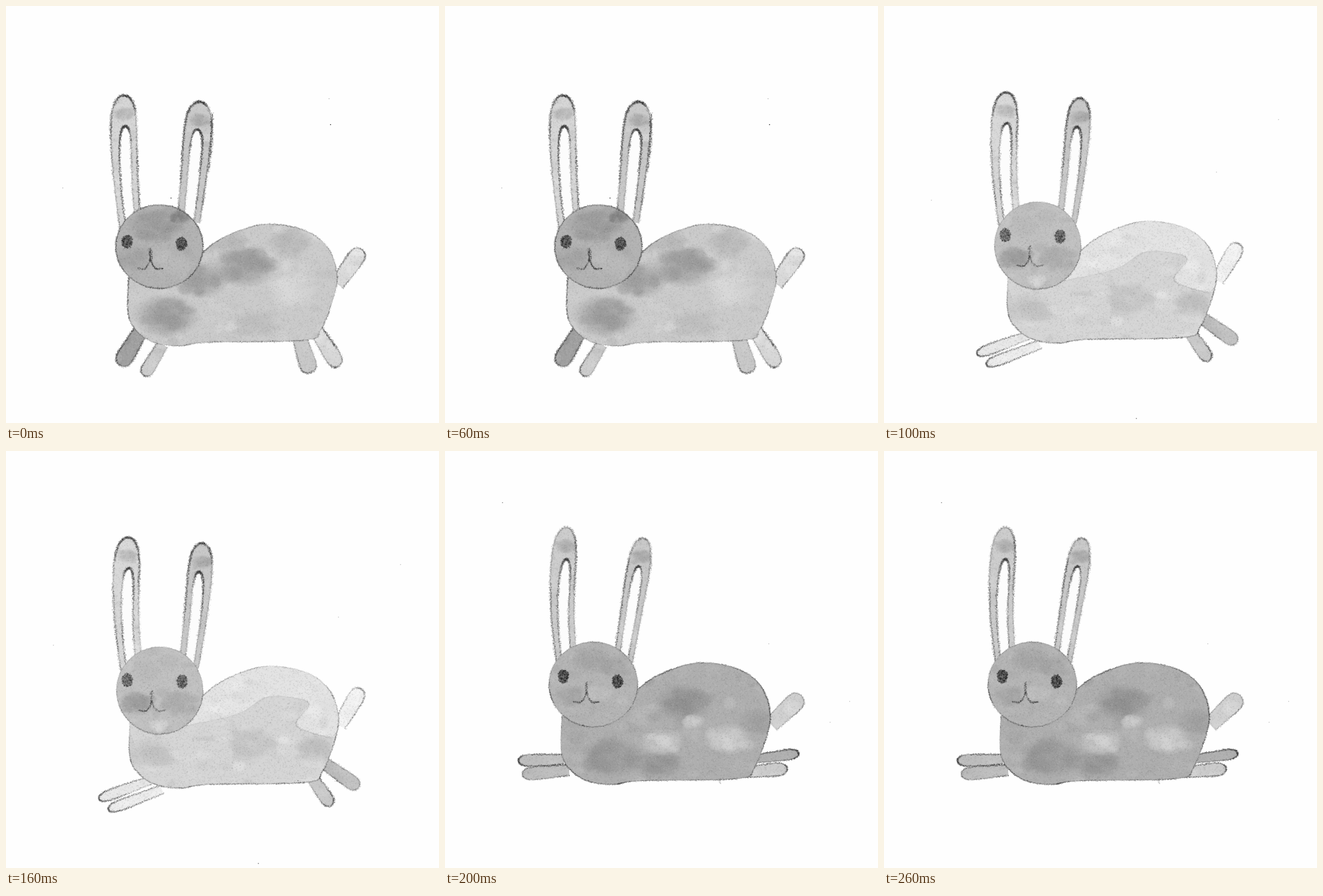
Write an HTML page with a canvas that moves like this. It is 600x579 px and loops after 300 ms.

```html
<!DOCTYPE html>
<html lang="en">
<head>
<meta charset="utf-8">
<title>Running rabbit</title>
<style>
html, body { margin: 0; width: 100%; height: 100%; overflow: hidden; background: #fefefe; }
canvas { display: block; }
</style>
</head>
<body>
<canvas id="stage" width="600" height="579"></canvas>
<script>
const W = 600, H = 579, HOLD = 100;
let g, seed;

function rnd() {
  seed = (seed * 1664525 + 1013904223) >>> 0;
  return seed / 4294967296;
}
const spread = r => (rnd() + rnd() - 1) * r;
const mix = (a, b, t) => a + (b - a) * t;
const gray = (v, a = 1) => `rgba(${v},${v},${v},${a})`;

// Outlines: lists of [x, y], about one per pixel

// Open Catmull-Rom curve through key points
function curve(keys) {
  const at = i => keys[Math.max(0, Math.min(keys.length - 1, i))], out = [];
  for (let i = 0; i < keys.length - 1; i++) {
    const [a, b, c, d] = [-1, 0, 1, 2].map(k => at(i + k));
    const steps = Math.ceil(Math.hypot(c[0] - b[0], c[1] - b[1]));
    for (let k = 0; k < steps; k++) {
      const t = k / steps;
      out.push([0, 1].map(j => b[j] + t / 2 * (c[j] - a[j] +
        t * (2 * a[j] - 5 * b[j] + 4 * c[j] - d[j] + t * (3 * (b[j] - c[j]) + d[j] - a[j])))));
    }
  }
  return out;
}

// Rounded leaf from base to tip, widest near the tip, for ears, legs and tail
function petal([bx, by], [tx, ty], w, bend = 0) {
  const len = Math.hypot(tx - bx, ty - by), out = [];
  const nx = (by - ty) / len, ny = (tx - bx) / len;
  const n = Math.ceil(len + w);
  for (let i = -n; i <= n; i++) {
    const u = Math.sin((1 - Math.abs(i) / n) * Math.PI / 2);
    const half = Math.sign(i) * w * (.75 + .25 * u) * Math.sqrt(1 - u ** 9);
    out.push([mix(bx, tx, u) + bend * Math.sin(Math.PI * u) + nx * half, mix(by, ty, u) + ny * half]);
  }
  return out;
}

function oval(x, y, rx, ry) {
  const n = Math.ceil(Math.PI * (rx + ry));
  return Array.from({ length: n + 1 }, (_, i) => {
    const a = i / n * 2 * Math.PI;
    return [x + Math.cos(a) * rx, y + Math.sin(a) * ry];
  });
}

function bodyLine(dx, dy) {
  const keys = [[268, 346], [290, 328], [320, 313], [357, 303], [395, 306], [427, 318], [448, 339], [458, 368],
    [456, 397], [437, 448], [413, 464], [280, 467], [240, 472], [205, 467], [180, 450], [169, 425], [170, 376]];
  return curve(keys.map(([x, y]) => [x + dx, y + dy]));
}

function pathOf(line) {
  const p = new Path2D();
  line.forEach(([x, y]) => p.lineTo(x, y));
  return p;
}

function soft(x, y, rx, ry, tone, alpha) {
  const f = g.createRadialGradient(0, 0, 0, 0, 0, 1);
  f.addColorStop(0, gray(tone, alpha));
  f.addColorStop(.6, gray(tone, alpha * .85));
  f.addColorStop(1, gray(tone, 0));
  g.save();
  g.translate(x, y);
  g.scale(rx, ry);
  g.fillStyle = f;
  g.fillRect(-1, -1, 2, 2);
  g.restore();
}

// Ink wash: mottled base tone, ragged pools [x, y, radius, tone], paper grain
function wash(line, tone, pools = []) {
  const xs = line.map(q => q[0]), ys = line.map(q => q[1]);
  const x0 = Math.min(...xs), y0 = Math.min(...ys);
  const w = Math.max(...xs) - x0, h = Math.max(...ys) - y0;
  g.save();
  g.clip(pathOf(line));
  g.fillStyle = gray(tone);
  g.fillRect(x0, y0, w, h);
  for (let i = w * h / 350; i > 0; i--)
    soft(x0 + rnd() * w, y0 + rnd() * h, 5 + rnd() * 14, 4 + rnd() * 9, tone + spread(45), .25);
  for (const [x, y, r, v] of pools) {
    soft(x, y, r * 1.5, r, v, .6);
    for (let i = 0; i < 12; i++)
      soft(x + spread(r * 1.4), y + spread(r * .8), r * (.3 + rnd() * .4), r * (.2 + rnd() * .3), v, .4);
  }
  for (let i = w * h / 4; i > 0; i--) {
    g.fillStyle = gray(rnd() < .5 ? 255 : 80, .08);
    g.fillRect(x0 + rnd() * w, y0 + rnd() * h, 1.3, 1.3);
  }
  g.restore();
}

// Grainy crayon line whose pressure wanders
function pencil(line, width, dark) {
  let press = .8;
  g.strokeStyle = gray(70, dark * .2);
  g.lineWidth = width * .5;
  g.stroke(pathOf(line));
  for (const [x, y] of line) {
    press = Math.max(.4, Math.min(1.1, press + spread(.15)));
    for (let k = width * 1.2 * press; k > 0; k--) {
      g.fillStyle = gray(35 + rnd() * 50 | 0, dark * press * (.3 + rnd() * .6));
      g.fillRect(x + spread(width * .8) - .5, y + spread(width * .8) - .5, 1.1, 1.1);
    }
  }
}

function part(line, tone, width, dark, pools) {
  wash(line, tone, pools);
  pencil(line, width, dark);
}

function ear(base, tip, w, bend, tone, dark) {
  const inner = petal(base, [0, 1].map(j => mix(base[j], tip[j], .77)), w * .45, bend * .8);
  const shade = [[tip[0], tip[1] + 26, 11, tone - 35]];
  wash(petal(base, tip, w, bend), tone, shade);
  g.fillStyle = '#fcfcfc';
  g.fill(pathOf(inner));
  pencil(inner, 3, dark);
  pencil(petal(base, tip, w, bend), 3, dark);
}

function eye(x, y, dark) {
  g.fillStyle = gray(60, dark * .6);
  g.fill(pathOf(oval(x, y, 7, 9)));
  for (let i = 0; i < 180; i++) {
    const a = rnd() * 2 * Math.PI, r = Math.sqrt(rnd());
    g.fillStyle = gray(rnd() * 80 | 0, dark * .5);
    g.fillRect(x + Math.cos(a) * r * 8 - .6, y + Math.sin(a) * r * 10 - .6, 1.3, 1.3);
  }
}

function muzzle(x, y, dark) {
  pencil(curve([[x, y], [x, y + 16]]), 3.4, dark);
  for (const s of [-1, 1])
    pencil(curve([[x, y + 13], [x + s * 3, y + 21], [x + s * 9, y + 27], [x + s * 18, y + 26]]), 2, dark);
}

function specks(tone, ...spots) {
  g.fillStyle = gray(tone);
  for (const [x, y] of spots) g.fillRect(x, y, 1.3, 1.3);
}

function standing() {
  ear([173, 310], [163, 124], 20, -3.5, 214, .6);
  ear([253, 300], [269, 133], 21, 1, 200, .65);
  pencil(curve([[286, 150], [285, 190], [280, 230]]), 3.4, .75);
  part(petal([459, 386], [493, 338], 13), 222, 2.4, .5);
  part(petal([186, 452], [158, 499], 13), 160, 2.8, .6);
  part(petal([217, 470], [191, 513], 10), 205, 2.4, .45);
  part(petal([407, 462], [422, 509], 13), 200, 2.4, .4);
  part(petal([430, 450], [461, 500], 12), 215, 2.8, .7);
  part(bodyLine(0, 0), 202, 1.8, .5, [[330, 362, 30, 148], [270, 380, 27, 152], [222, 430, 32, 150],
    [310, 326, 18, 180], [390, 330, 22, 182], [400, 395, 26, 217], [345, 440, 20, 188]]);
  part(oval(212.5, 334, 60.5, 58), 178, 1.8, .55, [[205, 305, 26, 150], [242, 293, 11, 125], [175, 352, 20, 162], [240, 360, 18, 185]]);
  eye(168, 327, .85);
  eye(243, 330, .85);
  muzzle(200, 338, .85);
  specks(70, [449, 164], [228, 266]);
  specks(195, [447, 128], [78, 252]);
}

function reaching() {
  ear([174, 305], [169, 120], 20, -5, 216, .5);
  ear([253, 300], [272, 128], 18.5, 2, 200, .55);
  part(petal([462, 381], [492, 330], 12), 242, 2.2, .35);
  part(petal([200, 457], [129, 483], 8), 232, 2.2, .45);
  part(petal([216, 470], [142, 498], 8), 237, 2.2, .45);
  part(petal([440, 433], [489, 467], 11), 195, 2.4, .45);
  part(petal([420, 448], [451, 492], 10), 200, 2.4, .45);
  const body = bodyLine(2, -4);
  wash(body, 227);
  const tide = curve([[230, 385], [318, 366], [360, 342], [395, 342], [420, 351], [402, 379], [425, 392], [465, 400]]);
  g.save();
  g.clip(pathOf(body));
  wash([...tide, [465, 480], [150, 480], [150, 380]], 213,
    [[200, 420, 24, 192], [340, 406, 24, 194], [430, 412, 20, 188]]);
  pencil(tide, 2, .1);
  g.restore();
  pencil(body, 1.6, .4);
  part(oval(213, 332.5, 60, 60.5), 192, 1.5, .4, [[182, 350, 18, 152], [240, 350, 20, 168], [212, 381, 10, 215], [190, 305, 20, 185]]);
  eye(168, 318, .65);
  eye(244, 320, .65);
  muzzle(202, 334, .65);
  specks(205, [65, 269], [546, 157], [460, 230]);
  specks(130, [349, 572], [404, 457]);
}

function leaping() {
  ear([169, 298], [168, 106], 19, -6, 204, .45);
  ear([247, 292], [275, 121], 17.5, 0, 200, .5);
  part(petal([452, 380], [494, 340], 14), 208, 2, .5);
  part(petal([165, 428], [102, 430], 9), 192, 2, .65);
  part(petal([172, 443], [107, 449], 10), 188, 2, .65);
  part(petal([433, 427], [490, 420], 8), 175, 2, .75);
  part(petal([415, 446], [474, 441], 10), 203, 2, .55);
  part(bodyLine(-8, -9), 174, 1.6, .55, [[330, 350, 28, 142], [230, 425, 30, 146], [300, 434, 22, 146],
    [432, 375, 20, 158], [392, 400, 23, 210], [300, 404, 20, 210], [345, 375, 11, 205]]);
  part(oval(205.5, 324, 61.5, 59), 180, 1.6, .5, [[205, 290, 22, 163], [175, 340, 16, 162], [235, 300, 16, 162], [212, 338, 14, 192]]);
  eye(164, 313, .95);
  eye(239, 320, .95);
  muzzle(196, 322, .8);
  pencil(curve([[381, 456], [381, 462]]), 2, .6);
  specks(150, [79, 71]);
  specks(205, [448, 267], [560, 347], [533, 376]);
}

const poses = [standing, reaching, leaping].map((draw, i) => {
  const c = document.createElement('canvas');
  c.width = W;
  c.height = H;
  g = c.getContext('2d');
  g.fillStyle = '#fefefe';
  g.fillRect(0, 0, W, H);
  g.lineCap = g.lineJoin = 'round';
  seed = 71 + i * 919;
  draw();
  return c;
});

const stage = document.getElementById('stage').getContext('2d');
const start = performance.now();
function tick() {
  const t = Math.max(0, performance.now() - start);
  stage.drawImage(poses[Math.floor(t / HOLD) % poses.length], 0, 0);
  requestAnimationFrame(tick);
}
tick();
</script>
</body>
</html>
```
